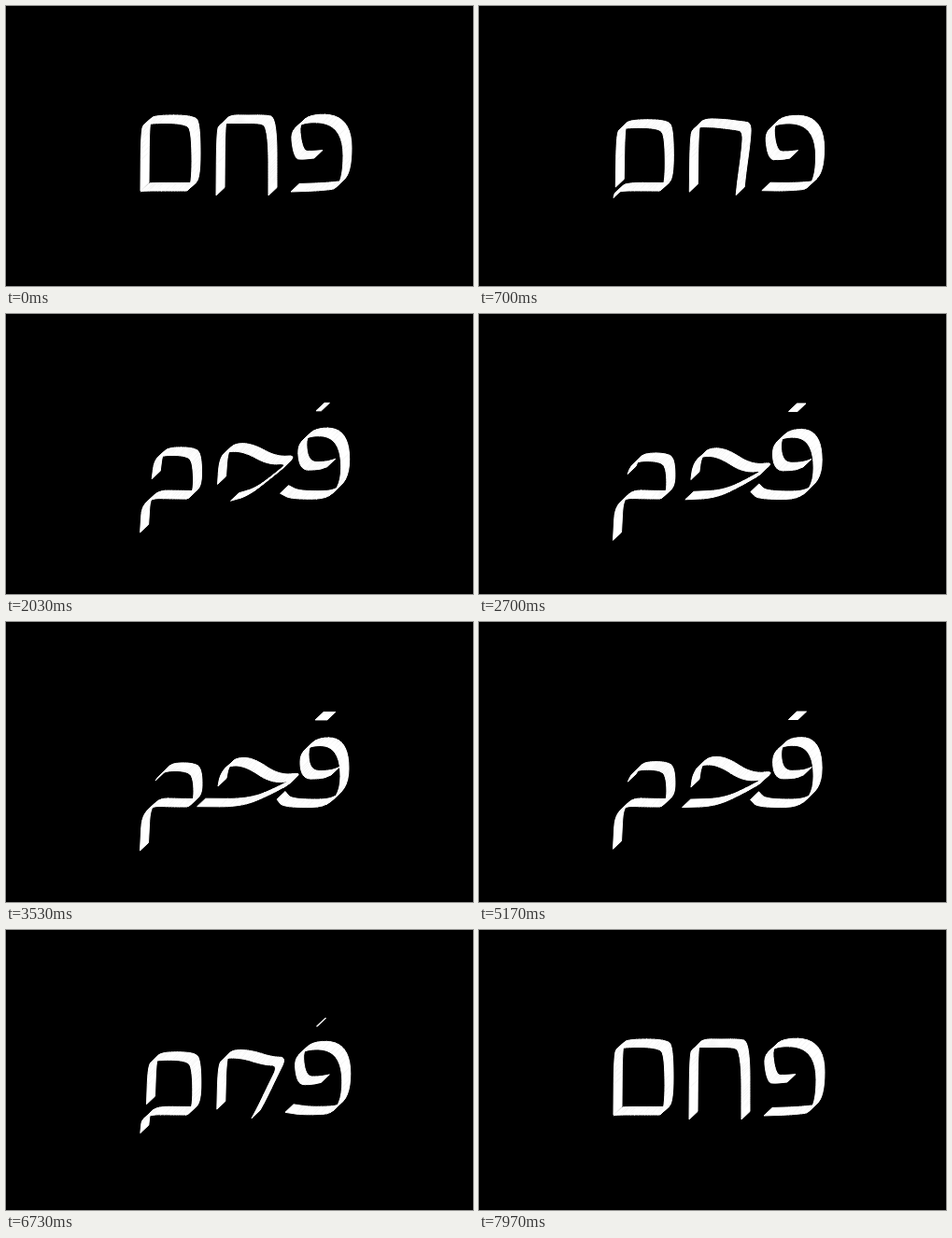
Animation of 500 by 300 pixels, one loop 8000 ms. Source, as an HTML page with a canvas:

```html
<!DOCTYPE html>
<html>
<head>
<meta charset="utf-8">
<style>
html, body { margin: 0; width: 100%; height: 100%; overflow: hidden; background: #000; }
canvas { display: block; }
</style>
</head>
<body>
<canvas id="stage" width="500" height="300"></canvas>
<script>
const ctx = document.getElementById('stage').getContext('2d');
const LOOP = 8000, STEPS = 10;
const NIB = { x: 9, y: -8.5 }; // broad pen edge, from its lower left end

// Guide points of each pen stroke, in the first and the second script
const mem = {
  from: [144,198, 144.5,132, 149,125.5, 192,125.5, 199,135, 199,198, 187,198, 146,198, 144,199],
  to: [160,170, 163,166, 170,159.5, 192,159.5, 201,166, 201,198, 183,198, 146,197, 143.5,245]
};
const het = {
  from: [225,203, 225.5,135, 229,125.5, 250,125.5, 271,125.5, 278,128, 281,150, 281,185, 281,203],
  to: [227,176, 229,165, 236,154, 256,154, 284,173, 311,169.5, 283,185, 252,198, 202,197.5],
  steadyEnd: true
};
const pe = {
  from: [330,163, 320,164, 308,164, 304,124, 361,125.5, 361,195, 335,198, 305,199],
  to: [348,164, 338,168, 315,168, 315,132.5, 358,132.5, 358,198, 297,199, 290,190]
};

const mix = (a, b, k) => a + (b - a) * k;
const mixPoint = (a, b, k) => ({ x: mix(a.x, b.x, k), y: mix(a.y, b.y, k) });

// Points run ahead of the overall progress, a steady end keeps pace with it
function pose({ from, to, steadyEnd }, p) {
  const pts = [];
  for (let i = 0; i < from.length; i += 2) {
    const k = steadyEnd && i === from.length - 2 ? p : p * (2 - p);
    pts.push({ x: mix(from[i], to[i], k), y: mix(from[i + 1], to[i + 1], k) });
  }
  return pts;
}

// Quadratic curves between the midpoints of the guide lines
function smooth(pts) {
  const last = pts.length - 1, path = [pts[0]];
  for (let i = 1; i < last; i++) {
    const a = mixPoint(pts[i - 1], pts[i], .5), c = mixPoint(pts[i], pts[i + 1], .5);
    for (let s = 0; s <= STEPS; s++) {
      const u = s / STEPS;
      path.push(mixPoint(mixPoint(a, pts[i], u), mixPoint(pts[i], c, u), u));
    }
  }
  return [...path, pts[last]];
}

// Drag the pen edge along a path
function sweep(path) {
  for (let i = 1; i < path.length; i++) {
    const a = path[i - 1], b = path[i];
    ctx.beginPath();
    ctx.moveTo(a.x, a.y);
    ctx.lineTo(b.x, b.y);
    ctx.lineTo(b.x + NIB.x, b.y + NIB.y);
    ctx.lineTo(a.x + NIB.x, a.y + NIB.y);
    ctx.closePath();
    ctx.fill();
    ctx.stroke();
  }
}

function draw(time) {
  const p = (1 - Math.cos(2 * Math.PI * time / LOOP)) / 2;
  ctx.fillStyle = '#000';
  ctx.fillRect(0, 0, 500, 300);
  ctx.fillStyle = ctx.strokeStyle = '#fff';
  ctx.lineJoin = 'round';
  for (const letter of [mem, het, pe]) sweep(smooth(pose(letter, p)));

  const dotWidth = 16 * (p - .17);
  if (dotWidth > 0) {
    const x = 333 - 2 * p, y = 102.5 + 2.5 * p;
    sweep([{ x, y }, { x: x + dotWidth, y }]);
  }
}

const start = performance.now();
function frame() {
  draw((performance.now() - start) % LOOP);
  requestAnimationFrame(frame);
}
frame();
</script>
</body>
</html>
```
